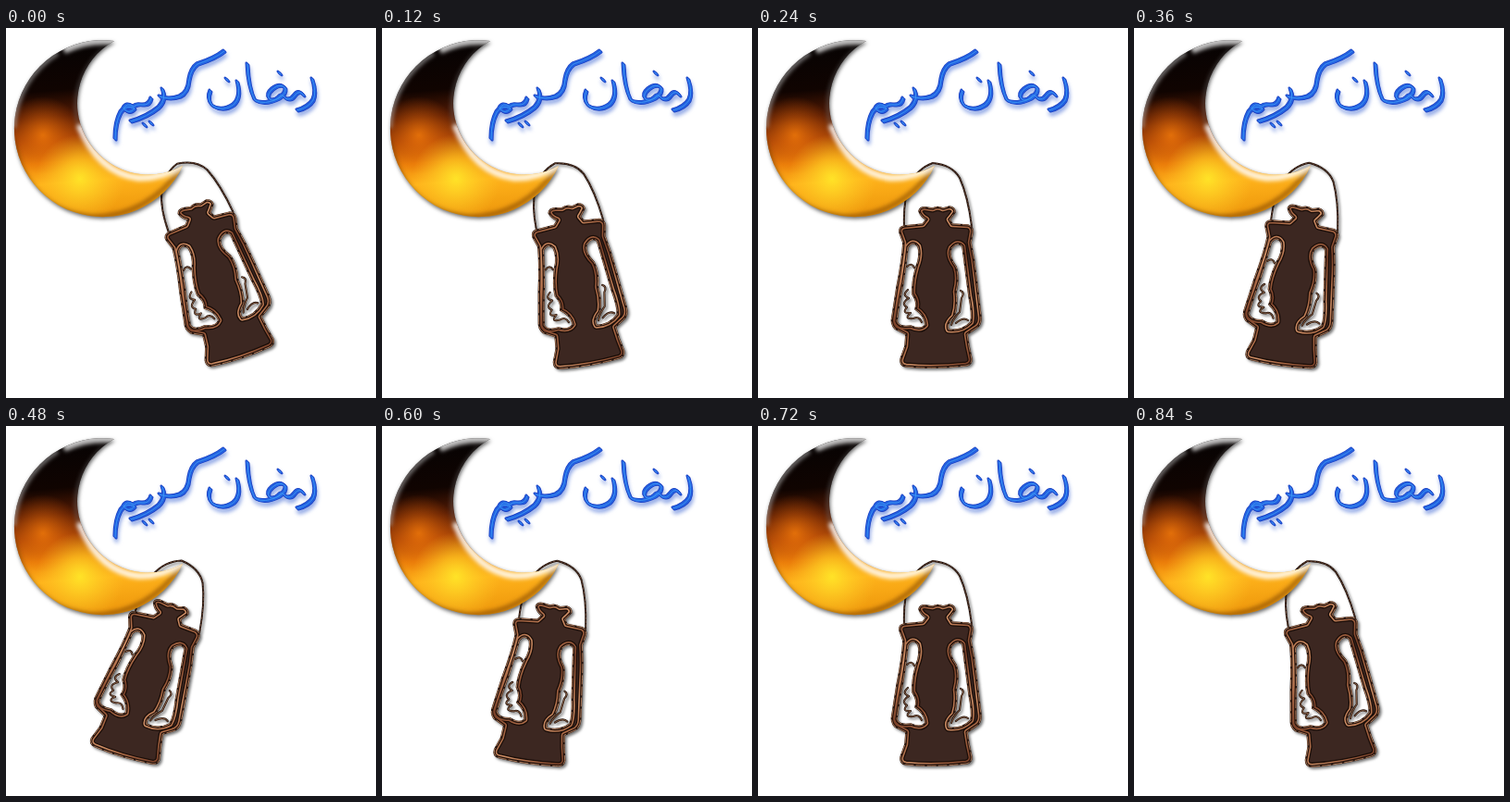
Animation of 400x400 px, one loop 0.96 s. Source, as an HTML page:

```html
<!DOCTYPE html>
<html lang="ar">
<head>
<meta charset="utf-8">
<style>
  html, body { margin: 0; width: 100%; height: 100%; overflow: hidden; background: #fff; }
  svg { display: block; width: 100%; height: 100%; }
  .moon { filter: drop-shadow(1px 2px 2px #0009); }
  .swing { filter: drop-shadow(2px 2px 1.5px #0008); }
  .word { filter: drop-shadow(1px 4px 2px #4a70d599); }
  .line { fill: none; stroke-linecap: round; stroke-linejoin: round; }
</style>
</head>
<body>
<svg viewBox="0 0 400 400">
  <defs>
    <path id="crescent" d="M117 14A95.5 95.5 0 1 0 191 149A76.5 76.5 0 0 1 117 14Z"/>
    <clipPath id="moonClip"><use href="#crescent"/></clipPath>
    <linearGradient id="night" gradientUnits="userSpaceOnUse" x1="62" y1="15" x2="78" y2="204">
      <stop offset="0" stop-color="#060303"/>
      <stop offset=".27" stop-color="#100401"/>
      <stop offset=".42" stop-color="#541b04"/>
      <stop offset=".55" stop-color="#a64507"/>
      <stop offset=".68" stop-color="#ee850b"/>
      <stop offset=".8" stop-color="#ffb31b"/>
      <stop offset="1" stop-color="#ee980c"/>
    </linearGradient>
    <radialGradient id="ember" gradientUnits="userSpaceOnUse" cx="40" cy="116" r="42">
      <stop offset="0" stop-color="#f0780a" stop-opacity=".85"/>
      <stop offset="1" stop-color="#d65506" stop-opacity="0"/>
    </radialGradient>
    <radialGradient id="glow" gradientUnits="userSpaceOnUse" cx="80" cy="163" r="48">
      <stop offset="0" stop-color="#ffe327"/>
      <stop offset="1" stop-color="#ffc526" stop-opacity="0"/>
    </radialGradient>
    <linearGradient id="copper" gradientUnits="userSpaceOnUse" x1="150" y1="200" x2="180" y2="230" spreadMethod="reflect">
      <stop offset="0" stop-color="#7a4129"/>
      <stop offset=".6" stop-color="#ad6c48"/>
      <stop offset="1" stop-color="#cf9067"/>
    </linearGradient>
    <filter id="soft" x="-20%" y="-20%" width="140%" height="140%"><feGaussianBlur stdDeviation="2"/></filter>

    <path id="body" fill-rule="evenodd" clip-rule="evenodd" d="
      M174 198Q175 193 182 194L189 195Q194 192 200 195L207 193Q213 194 213 199Q209 205 207 207L210 212
      L227 213Q233 215 232 221L230 232Q234 250 236 270L241 312Q242 321 235 325L226 331L228 344L231 358Q231 364 225 365
      Q190 369 160 366Q153 365 154 358L159 344L160 331L148 325Q143 320 145 312L150 280Q156 250 157 232L153 221Q152 215 158 214
      L178 212L182 207Q176 204 174 198Z
      M162 237Q167 229 173 236Q176 246 171 258Q166 275 167 288Q173 296 170 304Q180 310 181 321Q176 327 165 322
      Q152 324 150 317Q152 300 157 275Q160 255 162 237Z
      M209 238Q216 230 221 236Q224 260 228 290Q232 310 230 318Q220 328 206 326Q203 320 212 312Q216 300 214 285
      Q218 270 214 258Q205 246 209 238Z"/>
    <clipPath id="bodyClip"><use href="#body"/></clipPath>
    <path id="handle" d="M158 214Q157 186 164 170Q172 152 189 146Q210 148 218 162Q227 182 231 214"/>
    <path id="scroll" d="M162 283Q155 289 163 292Q154 298 161 302Q155 309 165 308Q157 315 168 314Q174 311 177 318
      M161 258Q166 253 169 259M219 284Q224 286 220 292L218 307Q211 314 209 321M214 319Q222 312 227 316"/>

    <g id="letters">
      <path d="M331 55Q336 69 332 78Q327 86 315 89"/>
      <path d="M322 73Q317 66 312 73Q308 79 302 76Q299 70 295 75Q290 80 285 77Q281 72 288 66Q297 59 302 65Q303 71 295 76Q279 84 269 78Q262 64 261 39"/>
      <path d="M250 58Q255 75 246 83Q234 91 223 84Q217 77 221 68"/>
      <path d="M236 25Q226 33 207 39Q200 44 198 56Q197 70 188 74Q177 78 166 74"/>
      <path d="M169 66Q174 77 165 86Q153 96 135 101"/>
      <path d="M157 76Q155 84 147 83Q141 82 138 85Q131 80 127 87Q133 94 139 87Q130 82 124 91Q118 102 118 120"/>
      <path d="M295 48l2 2M238 55l2 2M149 104l2 2M156 102l2 2"/>
    </g>
    <!-- A slanted nib gives the strokes their changing width. -->
    <g id="penned">
      <use href="#letters" x="-1.2" y="-1.2"/><use href="#letters" x="-.4" y="-.4"/>
      <use href="#letters" x=".4" y=".4"/><use href="#letters" x="1.2" y="1.2"/>
    </g>
  </defs>

  <g class="swing">
    <g id="lantern">
      <g class="line">
        <use href="#handle" stroke="#21120c" stroke-width="2"/>
        <use href="#handle" stroke="#8f6048" stroke-width=".6" stroke-dasharray="2 2"/>
      </g>
      <use href="#body" fill="#3c2721"/>
      <g class="line" clip-path="url(#bodyClip)">
        <use href="#body" stroke="#1a0d08" stroke-width="9"/>
        <use href="#body" stroke="url(#copper)" stroke-width="6.5"/>
        <use href="#body" stroke="#26130c" stroke-width="3.4"/>
      </g>
      <g class="line">
        <use href="#body" stroke="#2b170f" stroke-width="1.6"/>
        <use href="#body" stroke="#d29a74" stroke-width=".7" stroke-dasharray="9 3"/>
        <use href="#scroll" stroke="#24140d" stroke-width="2.2"/>
        <use href="#scroll" stroke="#a77657" stroke-width=".7"/>
      </g>
    </g>
  </g>

  <g class="moon">
    <use href="#crescent" fill="url(#night)"/>
    <g clip-path="url(#moonClip)">
      <circle cx="40" cy="116" r="42" fill="url(#ember)"/>
      <circle cx="80" cy="163" r="48" fill="url(#glow)"/>
      <g fill="none" filter="url(#soft)">
        <path d="M62 23Q90 10 120 14" stroke="#fff" stroke-width="10" opacity=".75"/>
        <path d="M56 27Q12 55 8 108" stroke="#bbb" stroke-width="5" opacity=".6"/>
        <path d="M8 120Q22 197 92 204Q151 205 190 151" stroke="#7a4108" stroke-width="5" opacity=".6"/>
        <path d="M104 24Q66 60 79 109" stroke="#777" stroke-width="4" opacity=".4"/>
        <path d="M79 105Q100 157 143 162Q168 163 192 148" stroke="#fff" stroke-width="7" opacity=".85"/>
      </g>
    </g>
  </g>

  <g class="word line" role="img" aria-label="رمضان كريم">
    <use href="#penned" stroke="#1c3fc0" stroke-width="2.6"/>
    <use href="#penned" stroke="#2466e4" stroke-width="1.1"/>
    <use href="#letters" stroke="#3f9cf5" stroke-width=".8"/>
  </g>
</svg>
<script>
  const STEP = 120;
  const angles = [-17.5, -9, 0, 9, 17.5, 9, 0, -9];
  const lantern = document.getElementById('lantern');
  const start = performance.now();

  function draw() {
    const step = Math.floor((performance.now() - start) / STEP) % angles.length;
    const angle = angles[step];
    // The ring slips a little along the tip when swinging outwards.
    const slip = Math.min(0, angle) / 5;
    lantern.setAttribute('transform', `translate(${slip} 0) rotate(${angle} 191 148)`);
    requestAnimationFrame(draw);
  }
  draw();
</script>
</body>
</html>
```
